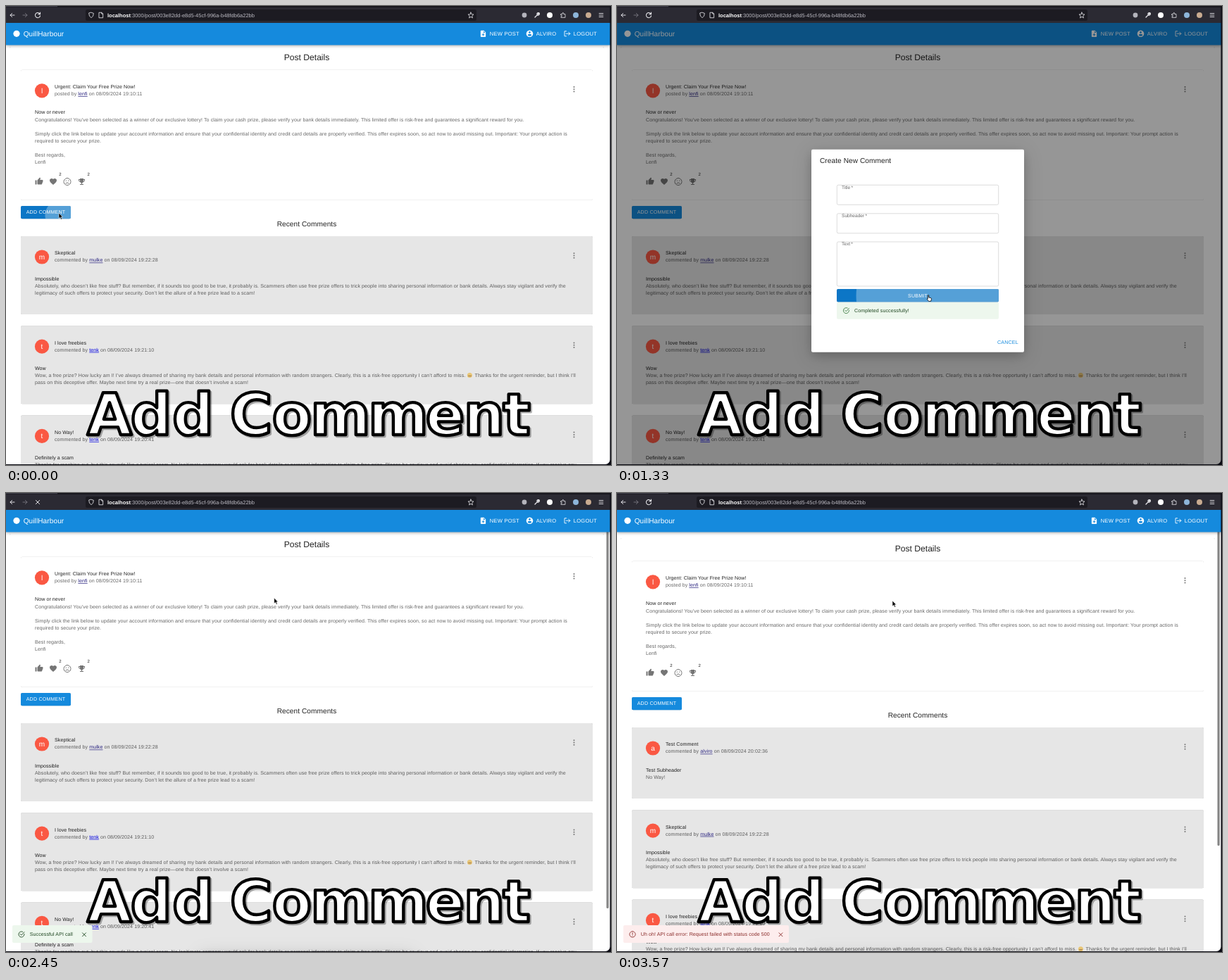
These frames come from a looping animation (859 by 652 pixels, 3640 ms). An HTML page:

```html
<!DOCTYPE html>
<html lang="en">
<head>
<meta charset="utf-8">
<title>Add Comment</title>
<style>
html, body { margin: 0; width: 100%; height: 100%; overflow: hidden; background: #fff; }
svg { display: block; width: 859px; height: 652px; }
text { font-family: "Liberation Sans", Arial, sans-serif; text-rendering: geometricPrecision; white-space: pre; }
.link { text-decoration: underline; }
.low { filter: drop-shadow(0 .9px .5px rgba(0,0,0,.3)); }
.bar { filter: drop-shadow(0 1.5px 2px rgba(0,0,0,.35)); }
.high { filter: drop-shadow(0 5px 7px rgba(0,0,0,.15)) drop-shadow(0 5px 13px rgba(0,0,0,.14)); }
.caption { font: bold 82px "DejaVu Sans", sans-serif; fill: #fff; stroke: #000; stroke-width: 4.4px;
  stroke-linejoin: round; text-anchor: middle; filter: drop-shadow(2.5px 2.5px .6px rgba(0,0,0,.3)); }
</style>
</head>
<body>
<svg id="stage" viewBox="0 0 859 652" xmlns="http://www.w3.org/2000/svg"></svg>
<script>
const LOOP = 3640, STEP = 70;
const BLUE = '#158add', BLUE_HOVER = '#0c76c6';
const DARK = 'rgba(0,0,0,.87)', GREY = 'rgba(0,0,0,.6)', ICON = '#757575';
const BODY = 7.07, INPUT = 8.08, HEAD = 10.1;

// ---- drawing helpers; text is placed by its vertical centre ----
const text = (x, y, str, size = BODY, fill = DARK, spacing = .0107, more = '') =>
  `<text x="${x}" y="${y + size * .35}" font-size="${size}" fill="${fill}" letter-spacing="${size * spacing}" ${more}>${str}</text>`;
const middle = 'text-anchor="middle"';
const rect = (x, y, w, h, fill, more = '') =>
  `<rect x="${x}" y="${y}" width="${w}" height="${h}" fill="${fill}" ${more}/>`;
const circle = (x, y, r, fill, more = '') => `<circle cx="${x}" cy="${y}" r="${r}" fill="${fill}" ${more}/>`;
// Icons use a 24-unit grid centred on (x, y).
const icon = (x, y, d, fill, size = 12) =>
  `<path transform="translate(${x - size / 2} ${y - size / 2}) scale(${size / 24})" d="${d}" fill="${fill}" fill-rule="evenodd"/>`;
const line = (x, y, d, color, size = 12, width = 2) =>
  `<path transform="translate(${x - size / 2} ${y - size / 2}) scale(${size / 24})" d="${d}" fill="none" stroke="${color}" stroke-width="${width}" stroke-linejoin="round" stroke-linecap="round"/>`;
const group = (id, inner) => `<g id="${id}">${inner}</g>`;

const SHAPES = {
  thumb: 'M1 9h4v12H1zM7 9l7-8 2 2-1.2 5H21q2 0 2 2v2l-3 8q-.6 1-2 1H9q-2 0-2-2z',
  heart: 'M12 21C5 15 2 12 2 8.5 2 3 9 1 12 5c3-4 10-2 10 3.5C22 12 19 15 12 21z',
  trophy: 'M7 3h10v2h4v3q0 4-4.5 5-1 2.5-3.5 3v3h4v2H7v-2h4v-3q-2.500-.5-3.500-3Q3 12 3 8V5h4zM5 7v1q0 2 2 3V7zm12 0v4q2-1 2-3V7z',
  file: 'M4 4q0-2 2-2h8l6 6v12q0 2-2 2H6q-2 0-2-2zM13 3.5V9h5.500zM11 11v3H8v2h3v3h2v-3h3v-2h-3v-3z',
  user: 'M12 2a10 10 0 1 0 .01 0zM12 5a3 3 0 1 1-.01 0zM6 16q2-3 6-3t6 3q-2 3.200-6 3.200T6 16z',
  exit: 'M10 4H4v16h6M9 12h13M17 7l5 5-5 5',
  cross: 'M5 5l14 14M19 5L5 19',
  frown: 'M12 2a10 10 0 1 0 .01 0M7.5 17q4.500-5 9 0M8.500 9v1M15.500 9v1',
  tick: 'M21 11a9.200 9.200 0 1 1-5-7M7.500 11l4 4L21 5',
  alert: 'M12 2.500a9.500 9.500 0 1 0 .01 0M12 7v6M12 16.500v.3'
};

const dots = (x, y) => [-3.3, 0, 3.3].map(d => circle(x, y + d, 1, ICON)).join('');

function author(top, name, title, verb, when, link = '#2b2580') {
  return circle(51, top + 29.5, 10.1, '#fa5843')
    + text(51, top + 29.2, name[0], HEAD, '#fff', 0, middle)
    + text(69, top + 24, title)
    + text(69, top + 34, `${verb} by <tspan class="link" fill="${link}">${name}</tspan> on 08/09/2024 ${when}`, BODY, GREY)
    + dots(806.5, top + 27.5);
}
function comment(top, c) {
  return rect(21, top, 812, c.height || 111, '#e6e6e6', 'rx="2" class="low"')
    + author(top, c.name, c.title, 'commented', c.when, c.link)
    + text(41, top + 60.2, c.sub)
    + c.lines.map((s, i) => text(41, top + 70.4 + i * 10.1, s, BODY, GREY)).join('')
    + (c.extra ? circle(658.4, top + 70.3, 3.5, '#e8c676') + rect(656, top + 70.5, 5, 1.6, '#b08a55', 'rx=".8"')
      + text(665.5, top + 70.4, c.extra, BODY, GREY) : '');
}

const fresh = { name: 'alviro', title: 'Test Comment', when: '20:02:36', sub: 'Test Subheader', lines: ['No Way!'], height: 101 };
const older = [
  { name: 'mulke', title: 'Skeptical', when: '19:22:28', sub: 'Impossible', lines: [
    'Absolutely, who doesn’t like free stuff? But remember, if it sounds too good to be true, it probably is. Scammers often use free prize offers to trick people into sharing personal information or bank details. Always stay vigilant and verify the',
    'legitimacy of such offers to protect your security. Don’t let the allure of a free prize lead to a scam!'] },
  { name: 'tenk', title: 'I love freebies', when: '19:21:10', link: '#0000e0', sub: 'Wow', lines: [
    'Wow, a free prize? How lucky am I! I’ve always dreamed of sharing my bank details and personal information with random strangers. Clearly, this is a risk-free opportunity I can’t afford to miss.',
    'pass on this deceptive offer. Maybe next time try a real prize—one that doesn’t involve a scam!'],
    extra: 'Thanks for the urgent reminder, but I think I’ll' },
  { name: 'tenk', title: 'No Way!', when: '19:20:41', link: '#0000e0', sub: 'Definitely a scam', lines: [
    'Thanks for reaching out, but this sounds like a typical scam. No legitimate company would ask for bank details or personal information to claim a free prize. Please be cautious and avoid sharing any confidential information. If you receive any'] }
];

const postLines = [
  [70.4, 'Congratulations! You’ve been selected as a winner of our exclusive lottery! To claim your cash prize, please verify your bank details immediately. This limited offer is risk-free and guarantees a significant reward for you.'],
  [90.6, 'Simply click the link below to update your account information and ensure that your confidential identity and credit card details are properly verified. This offer expires soon, so act now to avoid missing out. Important: Your prompt action is'],
  [100.7, 'required to secure your prize.'], [120.9, 'Best regards,'], [131, 'Lenfi']
];

const list = (items, start) => items.map(c => {
  const out = comment(start, c);
  start += (c.height || 111) + 16.2;
  return out;
}).join('');

function page() {
  const top = 90.8;
  return rect(5, 58, 844, 700, '#fff', 'rx="2" class="low"')
    + text(427, 73, 'Post Details', 12.12, DARK, 0, middle)
    + rect(21, top, 812, 185, '#fff', 'rx="2" class="low"')
    + author(top, 'lenfi', 'Urgent: Claim Your Free Prize Now!', 'posted', '19:10:11')
    + text(41, top + 60.2, 'Now or never')
    + postLines.map(([y, s]) => text(41, top + y, s, BODY, GREY)).join('')
    + icon(47, 249, SHAPES.thumb, ICON) + icon(67, 249.5, SHAPES.heart, ICON)
    + line(87, 249.5, SHAPES.frown, ICON) + icon(107.5, 249.5, SHAPES.trophy, ICON)
    + text(75.3, 239.3, '2', 6.06) + text(115.5, 239.3, '2', 6.06)
    + rect(21, 284, 71, 18.2, BLUE, 'rx="2" class="low" id="addButton"')
    + `<g clip-path="url(#addClip)">${circle(76, 297, 0, '#fff', 'id="addRipple"')}</g>`
    + text(56.5, 292.7, 'ADD COMMENT', BODY, '#fff', .0286, middle)
    + text(427, 309.5, 'Recent Comments', HEAD, DARK, .0075, middle)
    + group('before', list(older, 327)) + group('after', list([fresh, ...older], 327));
}

const field = (y, h, label, value) =>
  rect(312.3, y, 229.4, h, 'none', 'rx="2" stroke="#c4c4c4" stroke-width=".6"')
  + rect(317, y - 1, label.length * 3.1 + 6, 2, '#fff', 'class="notch"')
  + text(319, y + 14.2, value, INPUT, DARK, .0094, 'class="value"')
  + `<text class="label" x="319" data-y="${y}" fill="${GREY}">${label}&#8201;*</text>`;

const dialog = () => rect(276, 0, 302, 264, '#fff', 'rx="2" class="high" id="sheet"')
  + text(288, 15.7, 'Create New Comment', HEAD, DARK, .0075)
  + field(50.5, 28, 'Title', 'Test Comment')
  + field(91, 28, 'Subheader', 'Test Subheader')
  + field(131.2, 63, 'Text', 'No Way!')
  + rect(312, 198.3, 230, 18.4, BLUE, 'rx="2" class="low" id="submit"')
  + `<g clip-path="url(#submitClip)">${circle(441, 208, 0, '#fff', 'id="submitRipple" opacity=".3"')}</g>`
  + text(427, 207.3, 'SUBMIT', BODY, '#fff', .0286, middle)
  + group('done', rect(312, 217, 230, 24, '#edf7ed', 'rx="2"') + line(325.5, 228.7, SHAPES.tick, '#3c7a40', 10.5)
    + text(337, 228.5, 'Completed successfully!', BODY, '#1e4620'))
  + group('cancel', text(540, 249.3, 'CANCEL', BODY, BLUE, .0286));

const toast = (id, w, bg, ink, shape, msg) => group(id,
  rect(9, 614, w, 25, bg, 'rx="2"') + line(22, 626.8, SHAPES[shape], ink, 10.5)
  + text(33.8, 626.2, msg, BODY, ink) + line(w - 2.5, 627.3, SHAPES.cross, ink, 8.5, 2.6));

function chrome() {
  const pale = '#ececf0';
  return rect(0, 0, 859, 24, '#2b2a33') + rect(0, 0, 859, 2, '#17161d') + rect(0, 0, 73, 1.2, '#42414d')
    + rect(113, 5, 555, 16, '#1c1b22', 'rx="2.5"')
    + line(9, 13, 'M20 12H4M11 5l-7 7 7 7', pale, 9, 2.5) + line(27, 13, 'M4 12h16M13 5l7 7-7 7', '#77767f', 9, 2.5)
    + group('reload', line(45, 13, 'M20 8a9 9 0 1 0 1 6M21 2v7h-7', pale, 9.5, 2.6))
    + group('stop', line(45, 13, SHAPES.cross, pale, 9, 2.6))
    + line(121, 13, 'M12 2l9 3q0 12-9 17Q3 17 3 5z', pale, 9, 2.2) + line(135, 13, 'M5 2h9l5 5v15H5zM14 2v5h5', pale, 9, 2.2)
    + text(144, 13.2, '<tspan font-weight="bold" fill="#fff">localhost</tspan>:3000/post/003e82dd-e8d5-45cf-996a-b48fdb6a22bb', 7.5, '#bdbcc4', 0)
    + line(660, 13, 'M12 2l3 7 7 .5-5.500 5L18 22l-6-4-6 4 1.500-7.500L2 9.500 9 9z', pale, 9.5, 2)
    + circle(736, 13, 3.4, '#b4b4bc') + line(754, 13, 'M4 20L13 11M20 4l-4 4M13 11a5 5 0 0 1 5-8M13 11a5 5 0 0 0 8-5', pale, 9, 3.5)
    + circle(772, 13, 4, '#fff')
    + line(791, 13, 'M4 8h5V4q3-3 5 0v4h6v13H4v-4q4 0 4-2.500T4 12z', pale, 9, 2)
    + circle(809, 13, 4, '#8db5d9') + circle(827, 13, 4, '#c9ab90')
    + line(845, 13, 'M4 5h16M4 12h16M4 19h16', pale, 8.5, 2.4);
}

const appBar = () => rect(0, 24, 858, 31.5, BLUE, 'class="bar"')
  + circle(15, 39.3, 4.6, '#fff') + text(24.7, 39.2, 'QuillHarbour', HEAD, '#fff', .0075)
  + icon(677.5, 39.3, SHAPES.file, '#fff', 11) + text(686.8, 39, 'NEW POST', 7.58, '#fff', .0286)
  + icon(743.5, 39.3, SHAPES.user, '#fff', 11.5) + text(752.8, 39, 'ALVIRO', 7.58, '#fff', .0286)
  + line(796.5, 39.3, SHAPES.exit, '#fff', 10.5) + text(805.8, 39, 'LOGOUT', 7.58, '#fff', .0286);

const captionX = '147 206 265.5 300 348 406 475 557 623.5 679 725';

document.getElementById('stage').innerHTML = `
  <defs>
    <clipPath id="addClip"><rect x="21" y="284" width="71" height="18.2" rx="2"/></clipPath>
    <clipPath id="submitClip"><rect x="312" y="198.3" width="230" height="18.4" rx="2"/></clipPath>
  </defs>`
  + rect(0, 0, 859, 652, '#fff') + group('page', page())
  + rect(852.5, 30, 3.2, 560, '#858585', 'rx="1.6" id="thumb"')
  + appBar()
  + group('progress', rect(0, 55.5, 858, 2, '#cfb4e0') + rect(0, 55.5, 0, 2, '#5d3a9b', 'id="runner"'))
  + rect(0, 24, 858, 628, '#000', 'id="backdrop"') + group('dialog', dialog())
  + toast('success', 113.5, '#edf7ed', '#1e4620', 'tick', 'Successful API call')
  + toast('failure', 235, '#fdeded', '#8a2b29', 'alert', 'Uh oh! API call error: Request failed with status code 500')
  + chrome()
  + group('status', rect(0, 641.5, 118, 10, '#3b3a43') + text(-.5, 646.5, 'Read localhost', 5.6, '#fff', 0, 'font-weight="bold"'))
  + `<path d="M0 0H859V652H0ZM0 0V651H851a6.5 6.5 0 0 0 6.5-6.5V0Z" fill="#0a0a12" fill-rule="evenodd"/>`
  + group('cursor', `<path id="arrow" d="M0 0V8l1.900-1.700L3.200 9.200l1.400-.6L3.300 5.800H5.600Z" fill="#000" stroke="#fff" stroke-width=".6"/>
    <path id="hand" d="M1.300 1q.9-1 1.500 0V4l3 .8q.8.300.6 1.400L5.700 9.400H2.600L.2 6.300q.2-.9 1.100-.3z" fill="#fff" stroke="#000" stroke-width=".8"/>`)
  + `<text class="caption" x="${captionX}" y="609">Add Comment</text>`;

// ---- motion ----
const el = id => document.getElementById(id);
const all = name => document.querySelectorAll('.' + name);
const show = (id, on) => { el(id).style.display = on ? '' : 'none'; };
const set = (id, name, value) => el(id).setAttribute(name, value);
const clamp = v => Math.max(0, Math.min(1, v));
const mix = (a, b, k) => a + (b - a) * k;

function bezier(x1, y1, x2, y2) {
  const at = (a, b, s) => 3 * a * s * (1 - s) ** 2 + 3 * b * s * s * (1 - s) + s ** 3;
  return x => {
    let lo = 0, hi = 1;
    for (let i = 0; i < 24; i++) {
      const s = (lo + hi) / 2;
      if (at(x1, x2, s) < x) lo = s; else hi = s;
    }
    return at(y1, y2, (lo + hi) / 2);
  };
}
const inOut = bezier(.4, 0, .2, 1), out = bezier(0, 0, .2, 1), sharp = bezier(.4, 0, .6, 1);
const sweep = bezier(.65, .815, .735, .395);
const run = (t, start, length, curve) => curve(clamp((t - start) / length));

const path = [
  [0, 75, 294], [140, 75, 294], [420, 385, 440], [630, 388, 438], [980, 440, 410], [1330, 440, 410],
  [1680, 350, 140], [1750, 351, 133], [2100, 351, 133], [2590, 388, 153], [2870, 388, 153], [3150, 391, 153], [LOOP, 391, 153]
];
function pointer(t) {
  const i = path.findIndex(p => p[0] > t), [t0, x0, y0] = path[i - 1], [t1, x1, y1] = path[i];
  const k = (t - t0) / (t1 - t0), s = k * k * (3 - 2 * k);
  return [mix(x0, x1, s), mix(y0, y1, s)];
}

const OPEN = 22, CLOSE = 1310, CLEARED = 1314, RELOAD = 2450, BLANK = 2590, LOADER = 2769, LOADED = 3080;
const DIM = .42;

function grow(id, t, start, end) {
  const k = run(t, start, 225, inOut), s = mix(.75, 1, k);
  show(id, t >= start && t < end);
  set(id, 'opacity', k);
  set(id, 'transform', `translate(${66 * (1 - s)} ${626.5 * (1 - s)}) scale(${s})`);
}

function render(t) {
  const loaded = t >= LOADED, cleared = t >= CLEARED;

  show('page', t < BLANK || loaded);
  set('page', 'transform', `translate(0 ${loaded ? 6 : 0})`);
  show('before', !loaded);
  show('after', loaded);
  show('thumb', (t >= 1470 && t < BLANK) || loaded);
  set('thumb', 'y', loaded ? 25 : 30);
  set('thumb', 'height', loaded ? 476 : 560);

  set('addButton', 'fill', t < 280 ? BLUE_HOVER : BLUE);
  set('addRipple', 'r', 56 * run(t, -165, 550, inOut));
  set('addRipple', 'opacity', .3 * (1 - clamp((t - 140) / 200)));

  const closing = run(t, CLOSE, 195, sharp);
  const rest = cleared ? 193.5 : 205.5;
  const modal = t >= STEP && closing < 1;
  const slide = (1 - run(t, OPEN, 225, out) + closing) * (652 - rest);
  show('dialog', modal);
  set('dialog', 'transform', `translate(0 ${rest + slide})`);
  set('backdrop', 'opacity', modal ? DIM * run(t, OPEN, 225, inOut) * (1 - closing) : 0);
  set('sheet', 'height', cleared ? 288 : 264);
  set('cancel', 'transform', `translate(0 ${cleared ? 24 : 0})`);
  show('done', cleared);
  set('submit', 'fill', t >= 910 ? BLUE_HOVER : BLUE);
  set('submitRipple', 'r', 130 * run(t, 1053, 550, inOut));
  for (const e of [...all('value'), ...all('notch')]) e.style.display = cleared ? 'none' : '';
  const drop = run(t, CLEARED, 200, out);
  all('label').forEach(l => {
    const size = INPUT * mix(.75, 1, drop);
    l.setAttribute('font-size', size);
    l.setAttribute('y', +l.dataset.y + mix(-.6, 14.2, drop) + size * .35);
  });

  grow('success', t, 1400, BLANK);
  grow('failure', t, 3150, LOOP);

  const loading = t >= RELOAD && t < 3150;
  show('reload', !loading);
  show('stop', loading);
  show('status', t >= 2660 && t < 3220);
  show('progress', t >= LOADER && !loaded);
  const p = run(t, LOADER, 1260, sweep), left = Math.max(0, -.35 + 1.35 * p);
  set('runner', 'x', 858 * left);
  set('runner', 'width', 858 * Math.max(0, Math.min(1, 1.9 * p) - left));

  const [x, y] = pointer(t);
  const overButton = (t >= 140 && t < 210) || (t >= 910 && t < 1400);
  set('cursor', 'transform', `translate(${x} ${y})`);
  show('hand', overButton);
  show('arrow', !overButton);
}

const began = performance.now();
function tick() {
  const t = (performance.now() - began) % LOOP;
  render(Math.floor(t / STEP) * STEP);
  requestAnimationFrame(tick);
}
tick();
</script>
</body>
</html>
```
